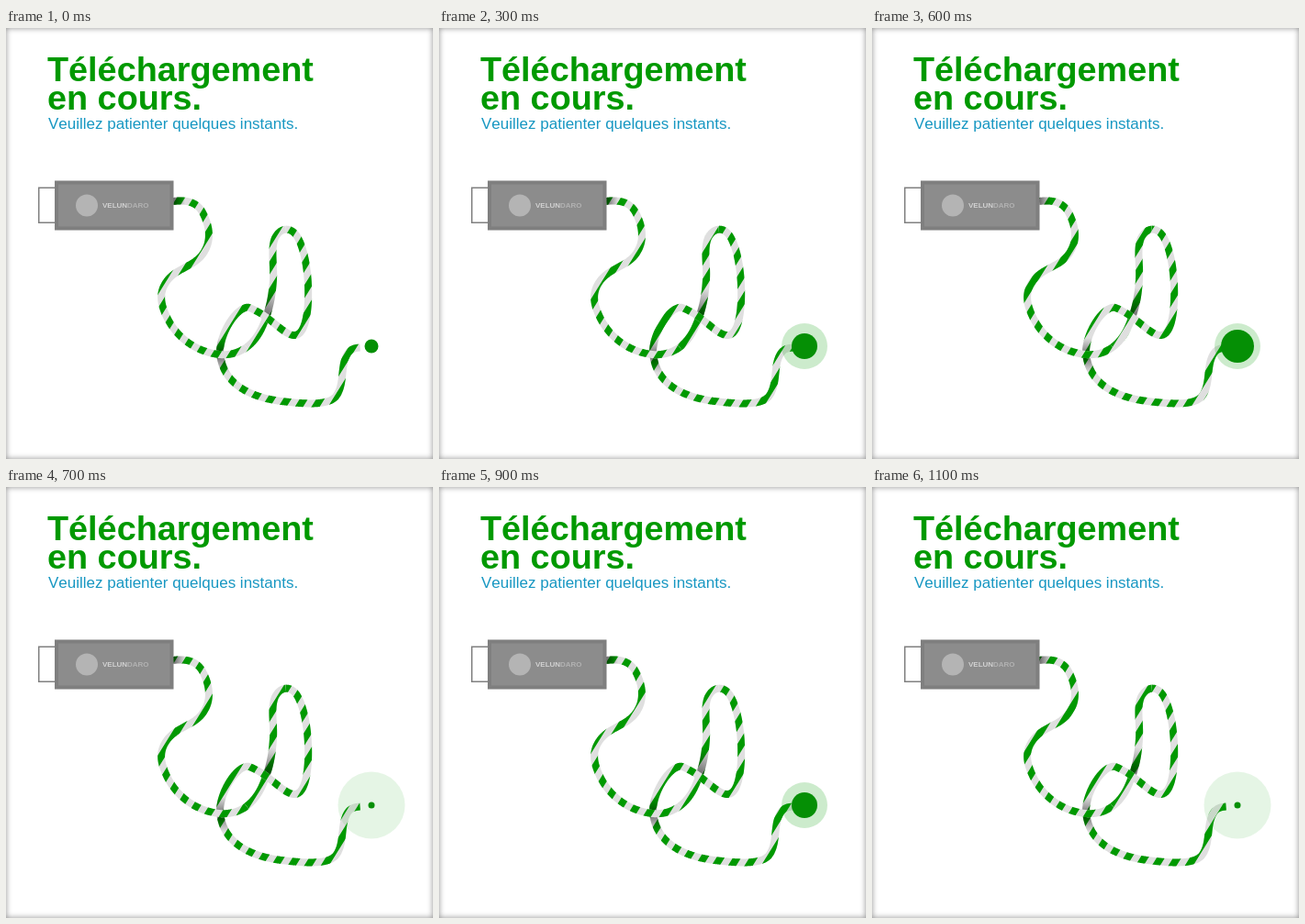
An HTML page with a canvas for the animation above (1.2 s loop, 465 by 470 pixels).

```html
<!DOCTYPE html>
<html lang="fr">
<head>
<meta charset="utf-8">
<title>Téléchargement</title>
<style>
  html, body { margin: 0; width: 100%; height: 100%; overflow: hidden; background: #fff; }
  canvas { display: block; box-shadow: inset 0 0 6px rgba(0, 0, 0, .45); }
</style>
</head>
<body>
<canvas id="stage" width="465" height="470"></canvas>
<script>
const W = 465, H = 470;
const ctx = document.getElementById('stage').getContext('2d');
const GREEN = '#009900', LIGHT = '#dfdfdf';
const HALF = 4, PERIOD = 18, LEAN = .62, SPEED = 4;
const STEP_MS = 100, STEPS = 12;

const cord = document.createElementNS('http://www.w3.org/2000/svg', 'path');
cord.setAttribute('d', `M182 189 C197 187 209 190 215 203 C222 217 223 231 217 242
  C208 260 188 260 176 275 C166 288 168 300 175 315 C186 338 207 353 232 356
  C254 358 270 346 279 326 C287 308 290 292 291 274 C292 258 288 241 293 229
  C299 217 311 216 318 229 C327 246 330 275 329 298 C328 318 324 335 314 335
  C302 335 288 314 265 305 C253 302 234 330 233 352 C234 384 260 402 300 407
  C325 410 350 412 359 402 C369 389 364 370 371 357 C374 351 378 349 386 348.5`);
const length = cord.getTotalLength();

// Cord samples every half pixel, with the normal pointing left of travel
const samples = Array.from({ length: Math.floor(length * 2) + 1 }, (_, i) => {
  const s = i / 2, p = cord.getPointAtLength(s);
  const a = cord.getPointAtLength(Math.max(0, s - 1));
  const b = cord.getPointAtLength(Math.min(length, s + 1));
  const d = Math.hypot(b.x - a.x, b.y - a.y);
  return { x: p.x, y: p.y, nx: (b.y - a.y) / d, ny: (a.x - b.x) / d };
});

function nearest(x, y) {
  const gaps = samples.map(p => Math.hypot(p.x - x, p.y - y));
  return gaps.indexOf(Math.min(...gaps));
}

// Outline of the cord between two sample indexes
function band(from, to) {
  const part = samples.slice(from, to + 1), shape = new Path2D();
  part.forEach(p => shape.lineTo(p.x + p.nx * HALF, p.y + p.ny * HALF));
  part.reverse().forEach(p => shape.lineTo(p.x - p.nx * HALF, p.y - p.ny * HALF));
  shape.closePath();
  return shape;
}

const end = samples.length - 1;
const lowCut = nearest(262, 348), topCut = nearest(305, 219.6);
const startStrand = band(0, lowCut);
const risingStrand = band(lowCut, topCut);
const lastStrand = band(topCut, end);
const startShade = band(0, 28);
const upperShade = band(nearest(284, 313), nearest(291, 284));
const lowerShade = band(nearest(237, 336), nearest(242, 378));

// Leaning stripes that slide sideways behind the cord's outline
function strand(shape, shift) {
  ctx.fillStyle = LIGHT;
  ctx.fill(shape);
  ctx.save();
  ctx.clip(shape);
  ctx.beginPath();
  const lean = H * LEAN;
  for (let x = shift % PERIOD - PERIOD; x < W + lean; x += PERIOD) {
    ctx.moveTo(x, 0);
    ctx.lineTo(x + PERIOD / 2, 0);
    ctx.lineTo(x + PERIOD / 2 - lean, H);
    ctx.lineTo(x - lean, H);
  }
  ctx.fillStyle = GREEN;
  ctx.fill();
  ctx.restore();
}

function shadow(shape, line, stops) {
  const g = ctx.createLinearGradient(...line);
  stops.forEach((alpha, i) => g.addColorStop(i / (stops.length - 1), `rgba(0,0,0,${alpha})`));
  ctx.fillStyle = g;
  ctx.fill(shape);
}

// Strands are painted from the lowest to the topmost one
function drawCord(shift) {
  strand(risingStrand, shift);
  shadow(upperShade, [284, 313, 291, 284], [.5, 0]);
  strand(lastStrand, shift);
  shadow(lowerShade, [0, 338, 0, 376], [0, .5, 0]);
  strand(startStrand, shift);
  shadow(startShade, [183, 0, 195, 0], [.5, 0]);
}

function disc(x, y, r, fill) {
  ctx.beginPath();
  ctx.arc(x, y, r, 0, 2 * Math.PI);
  ctx.fillStyle = fill;
  ctx.fill();
}

function text(str, x, y, font, fill) {
  ctx.font = font + ' "Liberation Sans", Arial, sans-serif';
  ctx.fillStyle = fill;
  ctx.fillText(str, x, y);
}

function drawKey() {
  ctx.lineWidth = 1.5;
  ctx.strokeStyle = '#808080';
  ctx.strokeRect(35.75, 174.25, 18, 38);
  ctx.fillStyle = '#7f7f7f';
  ctx.fillRect(53, 166.5, 129.5, 54);
  ctx.fillStyle = '#8c8c8c';
  ctx.fillRect(57, 170.5, 121.5, 46);
  disc(88, 193.5, 12, '#b4b4b4');
  text('VELUN', 105, 196, 'bold 8px', '#d2d2d2');
  text('DARO', 132, 196, 'bold 8px', '#b2b2b2');
}

// Dot radius, halo radius, halo opacity
const REST = [7.5, 0, 0], GROW = [14, 25, .2], FULL = [18, 25, .2], FADE = [3.5, 36.5, .1];
const PULSE = [REST, GROW, FULL, GROW, REST, GROW, FULL, FADE, REST, GROW, FULL, FADE];

// Stripe offset at the top edge that puts one at the cord's plug
const ORIGIN = 183.5 + 189 * LEAN;

function draw(now) {
  const step = Math.floor(now / STEP_MS) % STEPS;
  ctx.clearRect(0, 0, W, H);
  ctx.fontKerning = 'none';
  text('Téléchargement', 45, 58, 'bold 37.8px', GREEN);
  text('en cours.', 45, 89, 'bold 37.8px', GREEN);
  text('Veuillez patienter quelques instants.', 46, 110, '17px', '#1797c2');
  drawCord(ORIGIN + step * SPEED);
  drawKey();
  const [dot, halo, alpha] = PULSE[step];
  disc(398, 347, halo, `rgba(0,153,0,${alpha})`);
  disc(398, 347, dot, '#058f05');
  requestAnimationFrame(draw);
}
draw(performance.now());
</script>
</body>
</html>
```
